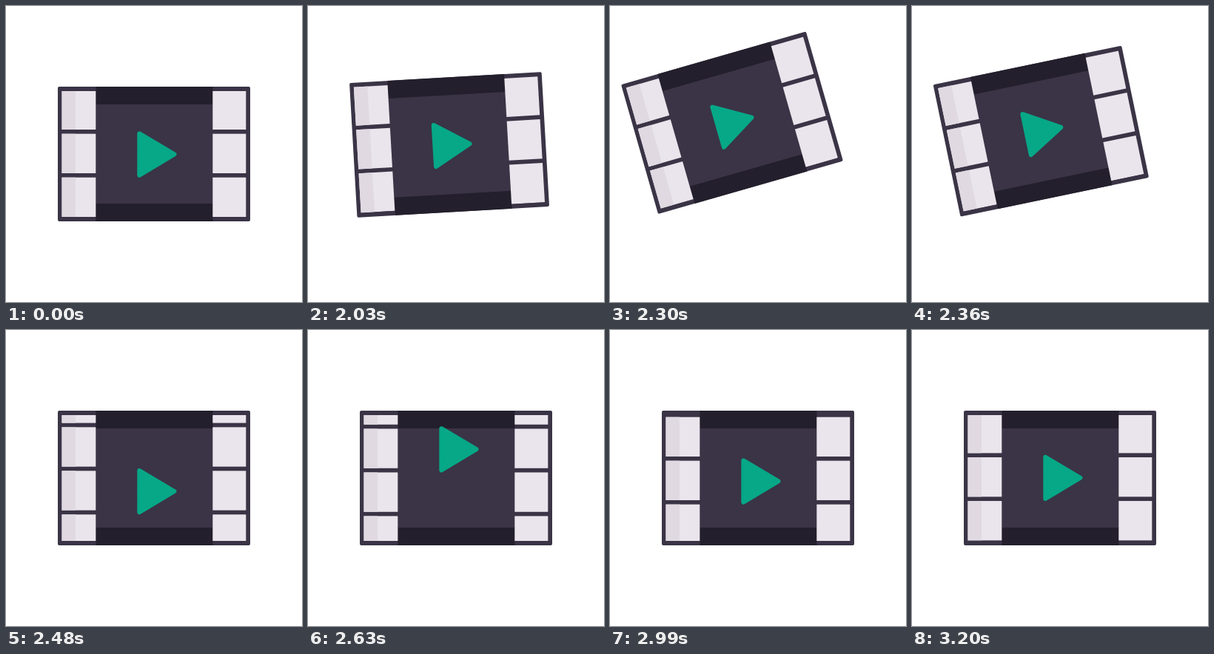
Recreate the animation shown at these times as an HTML page with a canvas. Size 400 by 400 pixels, loop 3.29 s.

```html
<!DOCTYPE html>
<html>
<head>
<meta charset="utf-8">
<style>
  html, body { margin: 0; overflow: hidden; background: #fff; }
  canvas { display: block; width: 400px; height: 400px; }
</style>
</head>
<body>
<canvas id="stage"></canvas>
<script>
const LOOP = 3290, STEP = 30, START = 2000, LAST = 40;
const PITCH = 59, FILM = 3 * PITCH;
const PEAK = 7, LAND = 15.3;            // tilt timing, in steps
const ROLL = 2458, SETTLE = 2679, PERIOD = 270;

const canvas = document.getElementById('stage');
const scale = Math.max(1, window.devicePixelRatio || 1);
canvas.width = canvas.height = 400 * scale;
const ctx = canvas.getContext('2d');

function box(color, x, y, w, h) {
  ctx.fillStyle = color;
  ctx.fillRect(x, y, w, h);
}

function clipped(x, y, w, h, draw) {
  ctx.save();
  ctx.beginPath();
  ctx.rect(x, y, w, h);
  ctx.clip();
  draw();
  ctx.restore();
}

// Swing up, then fall back with growing speed.
function tiltAt(k) {
  if (k <= 0 || k >= LAND) return { angle: 0, x: 0, y: 0 };
  let turn, x, y;
  if (k < PEAK) {
    const u = k / PEAK;
    x = Math.sin(u * Math.PI / 2);
    y = Math.sin(Math.min(1, k / 6) * Math.PI / 2);
    turn = 0.75 * x + 0.25 * (1 - Math.cos(u * Math.PI)) / 2;
  } else {
    turn = x = y = 1 - ((k - PEAK) / (LAND - PEAK)) ** 2;
  }
  return { angle: -18.4 * turn * Math.PI / 180, x: -40.3 * x, y: -48.5 * y };
}

// The strip runs on by one picture and springs into place.
function rollAt(t) {
  if (t < ROLL) return 0;
  if (t < SETTLE) return FILM * (t - ROLL) / (SETTLE - ROLL);
  const d = t - SETTLE;
  return FILM + 27 * Math.exp(-d / 182) * Math.sin(d * 2 * Math.PI / PERIOD);
}

function triangle(y) {
  ctx.beginPath();
  ctx.moveTo(180.3, 172.4 + y);
  ctx.lineTo(227.4, 200.4 + y);
  ctx.lineTo(180.3, 228.6 + y);
  ctx.closePath();
  ctx.fill();
  ctx.stroke();
}

function drawFilm(roll) {
  ctx.fillStyle = '#3a3446';
  ctx.beginPath();
  ctx.roundRect(70, 109, 260, 182, 2);
  ctx.fill();
  box('#231f2c', 121.5, 109, 158, 24);
  box('#231f2c', 121.5, 267, 158, 24);

  clipped(70, 115, 260, 170, () => {
    for (let i = -1; i < 4; i++) {
      const y = 113.7 + roll % PITCH + i * PITCH, h = 53.3;
      box('#eae5ec', 75.5, y, 45.8, h);
      box('#e0d9e2', 75.5, y, 18.5, h);
      box('#eae5ec', 279.3, y, 45, h);
    }
  });

  clipped(121, 109, 158, 182, () => {
    ctx.fillStyle = ctx.strokeStyle = '#06a887';
    ctx.lineWidth = 6;
    ctx.lineJoin = 'round';
    for (let i = 0; i < 3; i++) triangle(roll - i * FILM);
  });
}

function render(now) {
  const t = now % LOOP;
  const k = Math.max(0, Math.min(LAST, Math.floor((t - START) / STEP)));
  const tilt = tiltAt(k);
  ctx.setTransform(scale, 0, 0, scale, 0, 0);
  box('#fff', 0, 0, 400, 400);
  ctx.translate(200 + tilt.x, 200 + tilt.y);
  ctx.rotate(tilt.angle);
  ctx.translate(-200, -200);
  drawFilm(rollAt(START + k * STEP));
  requestAnimationFrame(() => render(performance.now() - origin));
}

const origin = performance.now();
render(0);
</script>
</body>
</html>
```
